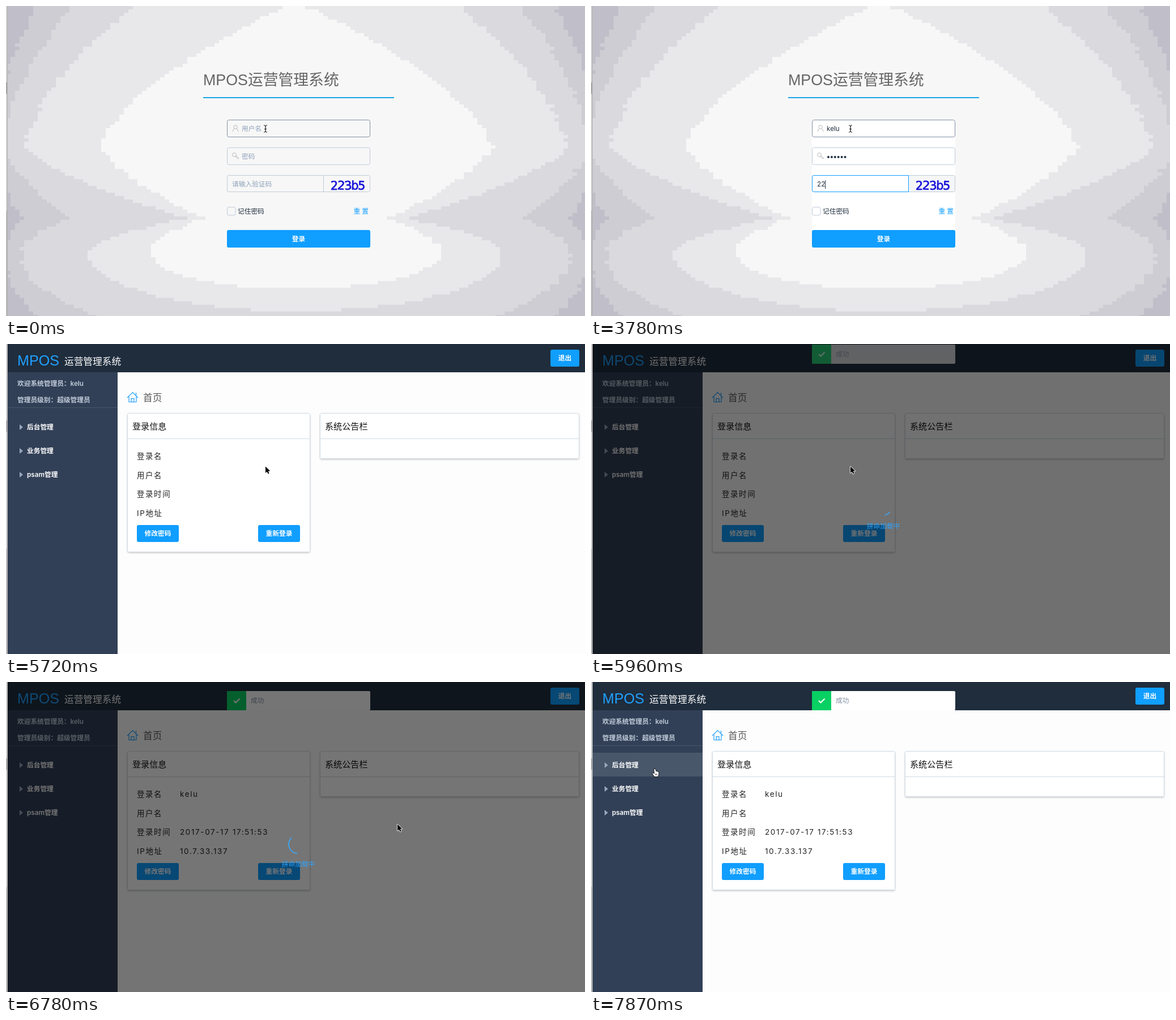
These frames come from a looping animation (1022 px wide and 548 px high, 8 s). An HTML page with a canvas:

```html
<!DOCTYPE html>
<html lang="zh">
<head>
<meta charset="utf-8">
<title>MPOS运营管理系统</title>
<style>
  html, body { margin: 0; width: 100%; height: 100%; overflow: hidden; background: #f7f7f7; }
  canvas { display: block; width: 1022px; height: 548px; }
</style>
</head>
<body>
<canvas id="stage" width="1022" height="548"></canvas>
<script>
const W = 1022, H = 548, LOOP = 8000;
const ctx = document.getElementById('stage').getContext('2d');
const SANS = 'Inter, "Noto Sans CJK SC", "Noto Sans CJK", sans-serif';
const TITLE = '"Liberation Sans", "Noto Sans CJK SC", "Noto Sans CJK", sans-serif';
const BLUE = '#109eff', EDGE = '#bfcbd9', HINT = '#8fa2ba', INK = '#1f2d3d';
const USER = 'kelu', CODE = '223b5';
const HOME_AT = 5720, HOLD = 210;

const clamp = x => Math.max(0, Math.min(1, x));
const mix = (a, b, k) => a + (b - a) * k;
const easeOut = x => 1 - (1 - clamp(x)) ** 2;
const easeInOut = x => x * x * (3 - 2 * x);

// Number of keys pressed by time t, one every `gap` ms.
const typed = (t, start, keys, gap = 150) =>
  t < start ? 0 : Math.min(keys, 1 + Math.floor((t - start) / gap));

function text(s, x, y, size, color, { weight = 400, align = 'left', family = SANS, gap = 0 } = {}) {
  ctx.font = `${weight} ${size}px ${family}`;
  ctx.textAlign = align;
  ctx.letterSpacing = gap + 'px';
  ctx.fillStyle = color;
  ctx.fillText(s, x, y + size * 0.37);
  const w = ctx.measureText(s).width;
  ctx.letterSpacing = '0px';
  return w;
}

function rect(x, y, w, h, color) {
  ctx.fillStyle = color;
  ctx.fillRect(x, y, w, h);
}

function box(x, y, w, h, r, fill, stroke) {
  ctx.beginPath();
  ctx.roundRect(x, y, w, h, r);
  if (fill) { ctx.fillStyle = fill; ctx.fill(); }
  if (stroke) { ctx.strokeStyle = stroke; ctx.lineWidth = 1; ctx.stroke(); }
}

function dot(x, y, r, color) {
  ctx.beginPath();
  ctx.arc(x, y, r, 0, 7);
  ctx.fillStyle = color;
  ctx.fill();
}

function line(points, color, width) {
  ctx.beginPath();
  points.forEach(([x, y]) => ctx.lineTo(x, y));
  ctx.strokeStyle = color;
  ctx.lineWidth = width;
  ctx.stroke();
}

function button(label, x, y, w, h = 30) {
  box(x, y, w, h, 3, BLUE);
  text(label, x + w / 2, y + h / 2, 11.7, '#fff', { weight: 600, align: 'center' });
}

// Half-width of a band of light at height y: a wide upper lobe, a waist, a lower lobe.
function halfWidth(y, { top, peak, waist, low, end }) {
  if (y < 245) {
    const u = y / 245;
    return mix(top, peak, u * (1.6 - 0.6 * u));
  }
  if (y < 375) return mix(peak, waist, ((y - 245) / 130) ** 1.5);
  if (y < 437) return mix(waist, low, Math.sin((y - 375) / 62 * Math.PI / 2));
  return y < end ? low * Math.sqrt(1 - ((y - 437) / (end - 437)) ** 2) : 0;
}

const BANDS = [
  { color: '#cecdd4', top: 455, peak: 545, waist: 480, low: 515, end: 680 },
  { color: '#dad9de', top: 395, peak: 520, waist: 400, low: 485, end: 600 },
  { color: '#e8e8ea', top: 285, peak: 480, waist: 195, low: 365, end: 540 },
  { color: '#f7f7f7', top: 15, peak: 347, waist: 164, low: 257, end: 500 }
];

function makeBackdrop() {
  const c = document.createElement('canvas');
  c.width = W;
  c.height = H;
  const g = c.getContext('2d');
  g.fillStyle = '#c0bfc9';
  g.fillRect(0, 0, W, H);
  let seed = 7;
  const jitter = n => ((seed = seed * 16807 % 2147483647) / 2147483647 - 0.5) * n;
  for (const band of BANDS) {
    g.fillStyle = band.color;
    for (let y = 0; y < H; y += 6) {
      const hw = halfWidth(y + 3, band);
      if (!hw) continue;
      const left = Math.round((512 - hw + jitter(8)) / 8) * 8;
      const right = Math.round((512 + hw + jitter(8)) / 8) * 8;
      g.fillRect(left, y, right - left, 6);
    }
  }
  return c;
}
const backdrop = makeBackdrop();

function edgeStrip() {
  rect(0, 0, 3, H, '#d2d2d2');
  rect(0, 135, 3, 20, '#a8a8a8');
  rect(0, 362, 3, H - 362, '#bcbcbc');
  rect(2, 0, 1, H, '#adadad');
}

// The caret blinks, starting again at each action.
function caret(x, y, t) {
  const last = [150, 1410, 2000, 2450, 3330, 3630, 4380, 5280].filter(a => a <= t).pop();
  if ((t - last) % 1200 < 600) rect(Math.round(x), y - 7, 1, 15, INK);
}

function userIcon(x, y) {
  ctx.beginPath();
  ctx.arc(x, y - 2, 3.2, 0, 7);
  for (const s of [-1, 1]) {
    ctx.moveTo(x + 5 * s, y + 6);
    ctx.quadraticCurveTo(x + 4.5 * s, y + 2, x + 1.8 * s, y + 1);
  }
  ctx.strokeStyle = '#b9b9b9';
  ctx.lineWidth = 1;
  ctx.stroke();
}

function keyIcon(x, y) {
  ctx.beginPath();
  ctx.arc(x - 2, y - 2, 3.4, 0, 7);
  ctx.strokeStyle = '#b9b9b9';
  ctx.lineWidth = 1;
  ctx.stroke();
  line([[x, y + 1], [x + 4.5, y + 5.5], [x + 6, y + 4], [x + 1, y]], '#b9b9b9', 1);
}

function captcha() {
  [...CODE].forEach((ch, i) => {
    ctx.save();
    ctx.translate(579.5 + i * 12.1, 316.5);
    ctx.rotate(0.08 * Math.sin(i * 2.2));
    ctx.font = '21px "DejaVu Sans", sans-serif';
    ctx.textAlign = 'center';
    ctx.fillStyle = ctx.strokeStyle = '#1712d8';
    ctx.lineWidth = 0.7;
    ctx.lineJoin = 'round';
    ctx.fillText(ch, 0, 8);
    ctx.strokeText(ch, 0, 8);
    ctx.restore();
  });
}

function errorNote(t) {
  const s = t < 1450 ? easeOut((t - 900) / 300) : clamp(1 - (t - 1450) / 244);
  if (t < 960 || s <= 0) return;
  ctx.save();
  ctx.globalAlpha = 0.3 + 0.7 * s;
  ctx.translate(390, 232);
  ctx.scale(1, s);
  text('请输入用户名', 0, 8.5, 10.05, '#ff4949');
  ctx.restore();
}

// Value or placeholder, with the caret behind the value when focused.
function entry(value, hint, x, y, focused, t) {
  const w = value ? text(value, x, y, 11.7, INK) : 0;
  if (!value) text(hint, x, y, 11.7, HINT, { weight: 500 });
  if (focused) caret(x + w, y, t);
}

function login(t) {
  const white = t >= 960;
  const fill = white ? '#fff' : '#f7f7f7';
  const focus = t < 150 ? 0 : t < 2450 ? 1 : t < 3330 ? 2 : 3;
  ctx.drawImage(backdrop, 0, 0);
  text('MPOS运营管理系统', 348, 130, 26.8, '#666', { family: TITLE });
  rect(348, 161, 337, 2, '#1ca5e4');
  if (white) rect(390, 201, 253, 226, '#fff');

  box(390.5, 201.5, 252, 30, 3, t >= 150 ? '#fff' : fill, focus === 1 ? '#3a7bd5' : '#8391a5');
  userIcon(405, 216);
  const name = USER.slice(0, typed(t, 1410, 1) + typed(t, 2000, 3));
  entry(name, '用户名', 416, 217, focus === 1, t);
  errorNote(t);

  box(390.5, 250.5, 252, 30, 3, fill, focus === 2 ? BLUE : EDGE);
  keyIcon(405, 265);
  const dots = typed(t, 2600, 6, 85);
  for (let i = 0; i < dots; i++) dot(419 + i * 5.9, 267, 2, INK);
  if (!dots) entry('', '密码', 416, 266, focus === 2, t);
  else if (focus === 2) caret(416 + dots * 5.9, 266, t);

  box(390.5, 299.5, 252, 29, 3, white ? '#f5f6f8' : fill, EDGE);
  box(390.5, 299.5, 170, 29, [3, 0, 0, 3], fill, focus === 3 ? BLUE : EDGE);
  const code = CODE.slice(0, typed(t, 3630, 2) + typed(t, 4380, 1) + typed(t, 5280, 2));
  entry(code, '请输入验证码', 399, 315, focus === 3, t);
  captcha();

  box(390.5, 355.5, 14.5, 14.5, 3, fill, EDGE);
  text('记住密码', 409, 363, 11.7, INK, { weight: 500 });
  text('重 置', 640, 363, 11.7, BLUE, { weight: 500, align: 'right' });
  button('登录', 390, 396, 253, 31);
}

function card(x, w, h, title) {
  ctx.save();
  ctx.shadowColor = 'rgba(0,0,0,.2)';
  ctx.shadowBlur = 3;
  ctx.shadowOffsetY = 1.5;
  box(x, 122, w, h, 3, '#fff');
  ctx.restore();
  box(x + 0.5, 122.5, w - 1, h - 1, 3, '#fff', '#d1dbe5');
  rect(x, 167, w, 1, '#d1dbe5');
  text(title, x + 9, 145, 15.1, '#111');
}

function toast(t) {
  const k = easeOut((t - 5829) / 300);
  if (!k) return;
  const y = Math.round(16 - 34 * (1 - k));
  ctx.save();
  ctx.globalAlpha = Math.min(1, k * 1.5);
  box(390, y, 253, 34, 2, '#fff');
  box(390, y, 34, 34, [2, 0, 0, 2], '#08d063');
  line([[402, y + 17], [405.5, y + 20.5], [412.5, y + 13.5]], '#fff', 2.2);
  text('成功', 432, y + 17, 11.7, '#8391a5');
  ctx.restore();
}

// The ring starts again with the second request.
function spinner(t) {
  const again = t >= 6350;
  const u = again ? t - 6395 + 45 * (t < 6395) : t - 5770;
  const p = (u % 1500) / 750;
  const first = easeInOut(Math.min(p, 1)), second = easeInOut(Math.max(0, p - 1));
  const start = 40 * first + 80 * second;
  const len = Math.min(1 + 89 * first, 125.6 - start);
  const unit = Math.PI * 2 / 125.6;
  const a = u / 2000 * Math.PI * 2 + start * unit - (again ? 0.52 : 0);
  ctx.beginPath();
  ctx.arc(515, 287, 16, a, a + len * unit);
  ctx.strokeStyle = '#3aa8fb';
  ctx.lineWidth = 1.7;
  ctx.lineCap = 'round';
  ctx.stroke();
  ctx.lineCap = 'butt';
  text('拼命加载中', 516, 321.5, 11.7, '#2fa3fb', { weight: 500, align: 'center' });
}

function mask(t) {
  const k = easeOut((t - 5765) / 300) * (1 - easeOut((t - 6734) / 300));
  if (k < 0.1) return;
  rect(3, 0, W, H, `rgba(0,0,0,${0.7 * k})`);
  spinner(t);
}

function sidebar(t) {
  rect(3, 50, 194, H, '#324057');
  text('欢迎系统管理员：' + USER, 20, 70, 11.7, '#c0ccda', { weight: 600 });
  text('管理员级别：超级管理员', 20, 98.5, 11.7, '#c0ccda', { weight: 600 });
  rect(3, 112, 194, 1, '#475669');
  rect(3, 125, 194, 42, `rgba(72,87,106,${clamp((t - 7400) / 300)})`);
  ['后台管理', '业务管理', 'psam管理'].forEach((label, i) => {
    const y = 147 + i * 42;
    ctx.beginPath();
    ctx.moveTo(24, y - 5);
    ctx.lineTo(30, y);
    ctx.lineTo(24, y + 5);
    ctx.fillStyle = '#97a8be';
    ctx.fill();
    text(label, 37, y, 11.7, '#fff', { weight: 600 });
  });
}

function houseIcon(x, y) {
  const c = '#20a0ff';
  line([[x - 9.5, y], [x, y - 9.5], [x + 9.5, y]], c, 1.2);
  line([[x - 6.5, y - 2], [x - 6.5, y + 7.5], [x + 6.5, y + 7.5], [x + 6.5, y - 2]], c, 1.2);
  ctx.strokeRect(x - 2.5, y + 1.5, 5, 6);
  line([[x + 6, y - 4], [x + 6, y - 9]], c, 1.2);
}

function home(t) {
  rect(3, 0, W, H, '#fdfdfd');
  rect(3, 0, W, 50, '#1f2d3d');
  text('MPOS', 20, 28.5, 25.1, '#20a0ff', { family: TITLE });
  text('运营管理系统', 103, 31, 16.7, '#fff');
  button('退出', 961, 10, 51);
  sidebar(t);
  houseIcon(223.5, 95);
  text('首页', 242, 95, 16.7, '#5a5a5a');

  card(214, 323, 246, '登录信息');
  card(554, 458, 81, '系统公告栏');
  const rows = { 登录名: USER, 用户名: '', 登录时间: '2017-07-17 17:51:53', IP地址: '10.7.33.137' };
  Object.entries(rows).forEach(([label, value], i) => {
    const y = 198 + i * 33.7;
    text(label, 231, y, 13.4, '#222', { gap: 1.67 });
    if (t >= 6350) text(value, 307, y, 13.4, '#222', { gap: 1.67 });
  });
  button('修改密码', 231, 320, 74);
  button('重新登录', 445, 320, 74);
  toast(t);
  mask(t);
}

// Out to the right, then a long decelerating sweep to the menu.
function mousePos(t) {
  const out = clamp((t - 6250) / 520) ** 2;
  const back = 1 - (1 - clamp((t - 6770) / 1050)) ** 3;
  return [mix(mix(457, 690, out), 113, back), mix(mix(216, 251, out), 153, back)];
}

function pointer(points, x, y, fill, stroke) {
  ctx.beginPath();
  points.forEach(([px, py]) => ctx.lineTo(x + px, y + py));
  ctx.closePath();
  ctx.lineJoin = 'round';
  ctx.lineWidth = 1.6;
  ctx.strokeStyle = stroke;
  ctx.stroke();
  ctx.fillStyle = fill;
  ctx.fill();
  ctx.lineJoin = 'miter';
}

function cursor(t) {
  const [x, y] = mousePos(t);
  if (t < 5580) {
    for (const s of [-1, 1]) {
      const end = 217 + 6 * s;
      line([[455, end], [457, end], [458, end - 1.5 * s], [459, end], [461, end]], '#222', 1);
    }
    rect(457.4, 212, 1.3, 10, '#222');
    rect(456, 217, 4, 1, '#222');
  } else if (t < 7400) {
    pointer([[1, 0.5], [1, 12], [3.7, 9.6], [5.5, 13.6], [7.5, 12.7], [5.8, 8.8], [9.3, 8.6]], x, y, '#000', '#fff');
  } else {
    pointer([[-1.5, 1], [0.5, 1], [1.5, 5], [5, 5.5], [6.5, 7], [6, 11], [5, 14], [-1, 14], [-4.5, 9], [-3.5, 8], [-1, 9.5]],
      x, y, '#fff', '#111');
    for (const dx of [1, 3.2]) line([[x + dx, y + 9], [x + dx, y + 12]], '#111', 0.8);
  }
}

// After sign-in the picture refreshes only every HOLD ms.
function draw(now) {
  const time = now % LOOP;
  const t = time < HOME_AT ? time : HOME_AT + HOLD * Math.floor((time - HOME_AT) / HOLD);
  (t < HOME_AT ? login : home)(t);
  edgeStrip();
  cursor(t);
}

const begin = performance.now();
function tick() {
  draw(performance.now() - begin);
  requestAnimationFrame(tick);
}
tick();
</script>
</body>
</html>
```
